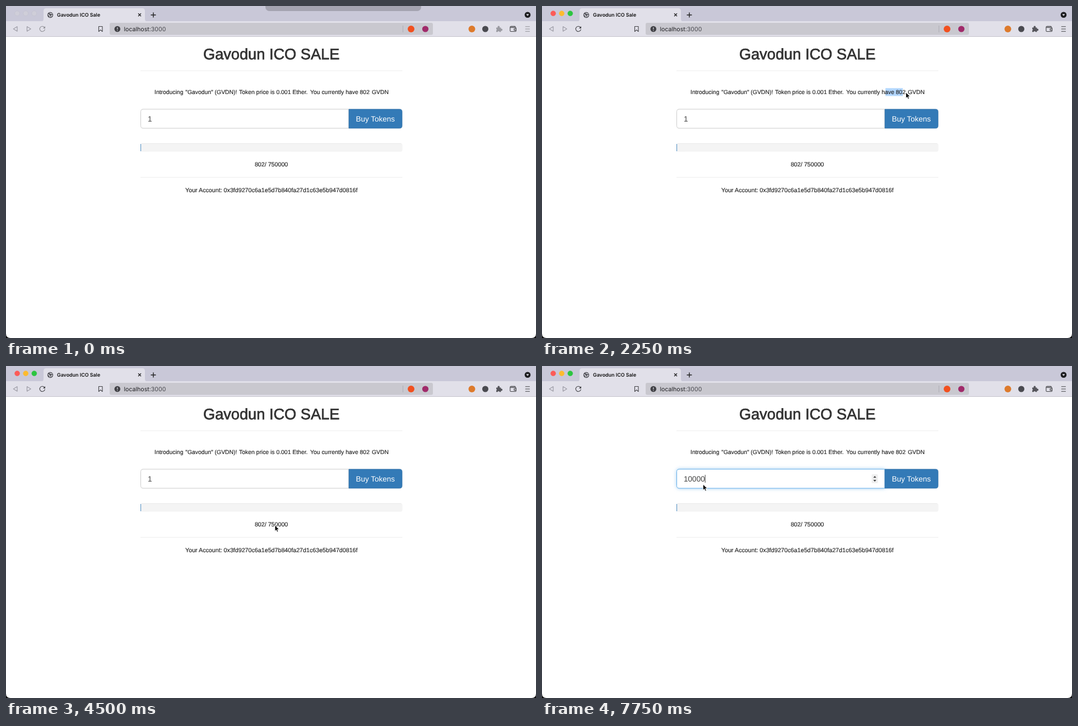
Write an HTML page that moves like this. It is 946 px wide and 592 px high and loops after 8000 ms.

```html
<!DOCTYPE html>
<html lang="en">
<head>
<meta charset="utf-8">
<title>Gavodun ICO Sale</title>
<style>
  html, body { margin: 0; width: 100%; height: 100%; overflow: hidden; background: #fff; }
  svg { display: block; width: 946px; height: 592px; }
  text { font-family: "Liberation Sans", Arial, sans-serif; text-rendering: geometricPrecision; white-space: pre; }
  .ui { font-family: Inter, sans-serif; }
  .page { fill: #222; stroke: #222; stroke-width: .15; font-size: 10.7px; }
  .intro { font-size: 10.4px; }
  .mid { text-anchor: middle; }
  .line { fill: none; stroke: #444448; stroke-width: 1.1; stroke-linecap: round; stroke-linejoin: round; }
  .dim { stroke: #96959f; }
  .focus { stroke: #66afe9; filter: drop-shadow(0 0 3px rgba(102, 175, 233, .6)); }
</style>
</head>
<body>
<svg viewBox="0 0 946 592" xmlns="http://www.w3.org/2000/svg">
  <rect width="946" height="592" fill="#fff"/>

  <!-- tab strip -->
  <rect width="946" height="28" fill="#c9c8d8"/>
  <path d="M62 28Q67 28 67 23V9Q67 4 72 4H243Q248 4 248 9V23Q248 28 253 28Z" fill="#e1e0e9"/>
  <g id="lights" stroke-width=".5">
    <circle cx="20" cy="13.2" r="4.5"/>
    <circle cx="35.2" cy="13.2" r="4.5"/>
    <circle cx="50.4" cy="13.2" r="4.5"/>
  </g>
  <circle cx="79" cy="16" r="5.2" fill="#55555b"/>
  <path d="M75 15.2Q77 16 78 17.6T77.6 20M78 12.2Q80 14 82.6 13.4M80.4 19.4Q80.5 16.6 83 16.4" fill="none" stroke="#e1e0e9" stroke-width="1.3"/>
  <text class="ui" x="91" y="19.1" font-size="8.9" font-weight="600" fill="#111">Gavodun ICO Sale</text>
  <path d="M236 13.3L241 18.3M241 13.3L236 18.3" stroke="#222" stroke-width="1.3"/>
  <path d="M258.5 16H267.5M263 11.5V20.5" stroke="#222" stroke-width="1.4"/>
  <circle cx="931" cy="15.8" r="5.3" fill="#1d1d20"/>
  <path d="M928.5 14.5H933.5L931 17.8Z" fill="#e4e3ea"/>

  <!-- toolbar -->
  <rect y="27" width="946" height="28" fill="#e1e0e9"/>
  <rect y="54" width="946" height="1" fill="#c6c5cd"/>
  <path class="line dim" d="M20 36.8V45L13.2 40.9ZM37.5 36.8V45L44.3 40.9Z"/>
  <g id="reload">
    <path class="line" d="M68.6 38.2A4.6 4.6 0 1 0 69.3 42"/>
    <path d="M66 39.9H70V35.9Z" fill="#444448"/>
  </g>
  <path class="line" d="M165.5 36.5H172V45.5L168.75 42.6L165.5 45.5Z"/>
  <rect x="185" y="30" width="577" height="21.5" rx="3" fill="#c9c8cf"/>
  <circle cx="198.8" cy="41" r="5.3" fill="#414146"/>
  <path d="M198.8 38V41.7M198.8 43V44.3" stroke="#dddce3" stroke-width="1.2"/>
  <text class="ui" x="210.5" y="44.6" font-size="10.6" fill="#222226">localhost<tspan fill="#48484e">:3000</tspan></text>
  <path d="M708.5 35V47" stroke="#aeadb6"/>
  <circle cx="723" cy="41" r="6" fill="#f1501f"/>
  <circle cx="748.5" cy="41" r="5.6" fill="#a02a6a"/>
  <circle cx="831.5" cy="41" r="6" fill="#dd7a2c"/>
  <circle cx="855.5" cy="41" r="5.5" fill="#4a4a50"/>
  <path id="puzzle" fill="#55555b" d="M875 38.4H877.7A1.9 1.9 0 1 1 881 38.4H883.4V40.6A1.9 1.9 0 1 1 883.4 44V46.2H880.9A1.7 1.7 0 0 0 877.6 46.2H875V43.7A1.7 1.7 0 0 0 875 40.7Z"/>
  <path class="line" d="M909 38.2V37Q909 36.4 908 36.4H901.5Q899.8 36.4 899.8 38V44Q899.8 45.5 901.3 45.5H909Q910.5 45.5 910.5 44V40Q910.5 38.4 909 38.4H901M910.5 40.5H907V43.4H910.5"/>
  <path id="menu" class="line" d="M927.3 36.8H934.5M927.3 41H934.5M927.3 45.2H934.5"/>
  <rect id="panel" x="463" y="-30" width="278" height="39" rx="7" fill="#a4a3b0"/>

  <!-- page -->
  <text x="595.3" y="94.7" font-size="27.2" text-anchor="end" fill="#333" stroke="#333" stroke-width=".75">Gavodun ICO SALE</text>
  <path d="M240 115.5H707.5M240 305.5H707.5" stroke="#eee"/>
  <rect id="mark" x="613" y="146.5" height="14" fill="#b3d7fe"/>
  <text class="page intro" y="157.3"><tspan x="265">Introducing</tspan><tspan x="320.2">"Gavodun"</tspan><tspan x="372.6">(GVDN)!</tspan><tspan x="416">Token price is 0.001 Ether.</tspan><tspan x="543">You currently have 802</tspan><tspan x="653">GVDN</tspan></text>

  <path id="field" d="M612 184H245Q240.5 184 240.5 188.5V213.5Q240.5 218 245 218H612Z" fill="#fff" stroke="#ccc"/>
  <text id="amount" x="253" y="205.8" font-size="13.6" fill="#444"></text>
  <path id="caret" d="M0 194V208" stroke="#333" stroke-width=".9"/>
  <g id="spinner">
    <rect x="588.5" y="193" width="11" height="16" rx="1.5" fill="#efefef"/>
    <path d="M591.3 199.3L594 196L596.7 199.3ZM591.3 203L594 206.3L596.7 203Z" fill="#444"/>
  </g>
  <path d="M612 184H702.5Q707 184 707 188.5V213.5Q707 218 702.5 218H612Z" fill="#337ab7" stroke="#2e6da4" stroke-width=".8"/>
  <text class="mid" x="659.2" y="205.8" font-size="13.5" fill="#fff">Buy Tokens</text>

  <rect x="240" y="244.8" width="467.5" height="15" rx="3" fill="#f4f4f4"/>
  <path d="M242.5 245.3H705" stroke="#e9e9e9"/>
  <path d="M240.6 246V259" stroke="#4a8ac0"/>
  <text class="page mid" x="473.6" y="286">802/ 750000</text>
  <text class="page mid" x="473.8" y="332">Your Account: 0x3fd9270c6a1e5d7b840fa27d1c63e5b947d0816f</text>

  <path id="pointer" d="M0 0V10.4L2.4 8.2L4 11.9L5.8 11.1L4.2 7.5H7.5Z" fill="#000" stroke="#fff" stroke-width=".8"/>
  <path d="M0 584V592H8Q0 592 0 584ZM946 584V592H938Q946 592 946 584Z" fill="#000"/>
</svg>
<script>
const LOOP = 8000, STEP = 250;
const $ = id => document.getElementById(id);
const show = (id, on) => $(id).style.display = on ? "" : "none";

// pointer keys: time, x, y
const path = [
  [500, 616, 24], [1000, 609.5, 105], [1250, 613, 147], [1500, 613, 153],
  [1750, 613, 154], [2250, 649.5, 154], [2500, 668, 154], [2750, 684, 156],
  [3000, 664, 174], [3500, 529, 217], [3750, 500, 264], [4000, 452, 282],
  [4500, 480, 284], [5000, 508, 284], [5500, 293, 217], [5750, 287.5, 211]
];

function pointerAt(t) {
  const i = path.findIndex(k => k[0] > t);
  if (i < 0) return path[path.length - 1].slice(1);
  const [t0, x0, y0] = path[Math.max(0, i - 1)], [t1, x1, y1] = path[i];
  const k = t1 > t0 ? (t - t0) / (t1 - t0) : 0;
  return [x0 + (x1 - x0) * k, y0 + (y1 - y0) * k];
}

function draw(now) {
  const t = Math.floor((now % LOOP) / STEP) * STEP;
  const active = t >= 500, focus = t >= 6000;

  const colors = active ? ["#fc5b57", "#fdbb2f", "#2bc540"] : Array(3).fill("#cfced9");
  [...$("lights").children].forEach((c, i) => {
    c.setAttribute("fill", colors[i]);
    c.setAttribute("stroke", active ? colors[i] : "#bdbcc8");
  });
  for (const id of ["reload", "puzzle", "menu"]) $(id).style.opacity = active ? 1 : .5;

  show("panel", !active);
  $("panel").setAttribute("y", t < 250 ? -30 : -35);

  const [x, y] = pointerAt(t);
  show("pointer", active);
  $("pointer").setAttribute("transform", `translate(${x} ${y})`);

  show("mark", t >= 2000 && t < 2750);
  $("mark").setAttribute("width", Math.max(0, x - 618.5));

  $("field").setAttribute("class", focus ? "focus" : "");
  show("spinner", (t >= 3250 && t < 3750) || t >= 5750);

  const zeros = Math.max(0, Math.min(4, (t - 6750) / STEP));
  $("amount").textContent = "1" + "0".repeat(zeros);
  show("caret", focus && t !== 6500);
  $("caret").setAttribute("transform", `translate(${261 + zeros * 7.56} 0)`);
}

function tick(now) {
  draw(now);
  requestAnimationFrame(tick);
}
draw(0);
requestAnimationFrame(tick);
</script>
</body>
</html>
```
